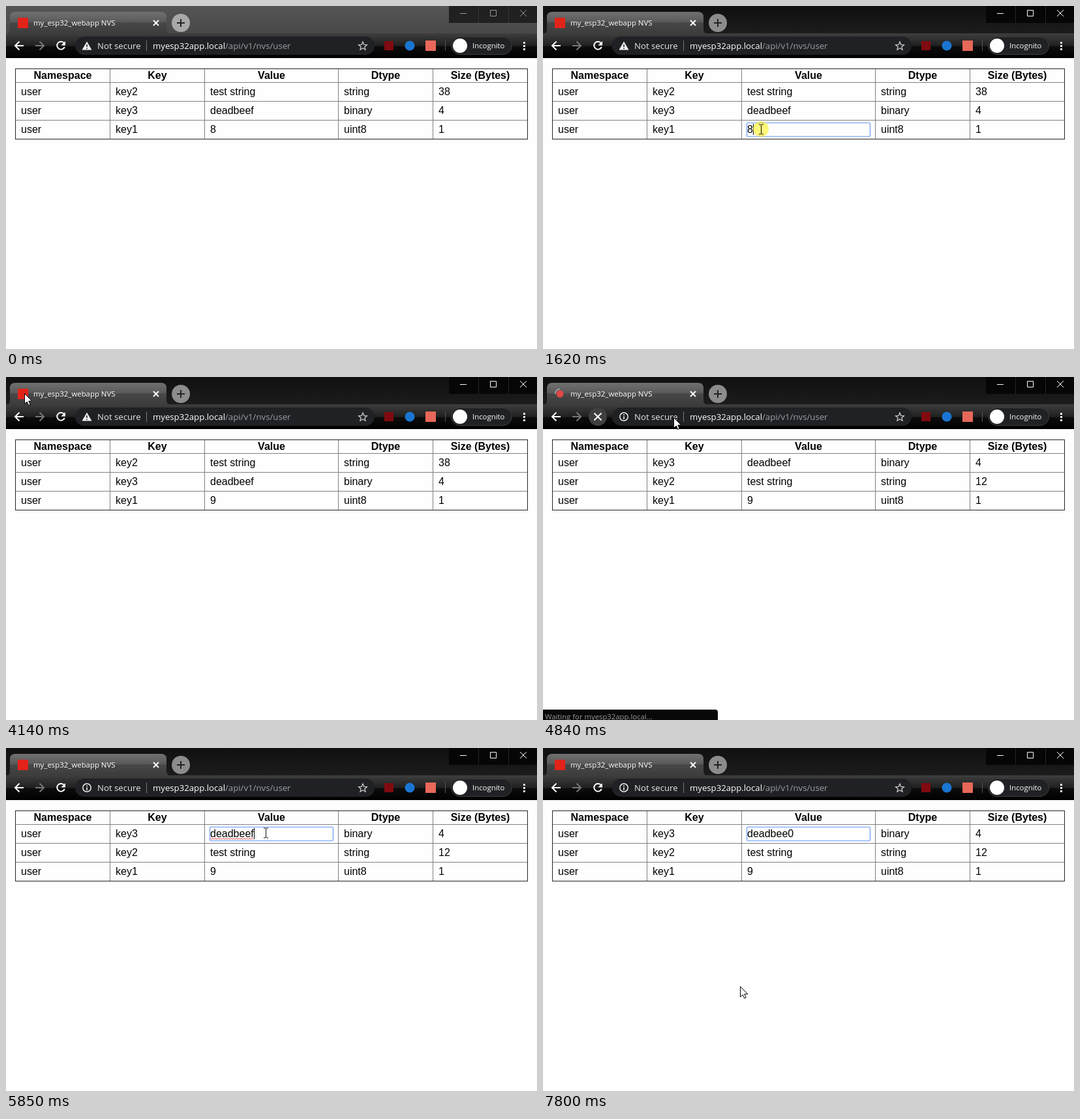
An HTML page for the animation above (8 s loop, 814 px wide and 527 px high).

```html
<!DOCTYPE html>
<html lang="en">
<head>
<meta charset="utf-8">
<title>NVS table</title>
<style>
html, body { margin: 0; width: 100%; height: 100%; overflow: hidden; background: #fefefe; }
svg { display: block; width: 814px; height: 527px; }
.ui { font-family: "Open Sans", "Noto Sans", sans-serif; fill: #fff; white-space: pre; }
.cell { font: 16px "Liberation Sans", Arial, sans-serif; fill: #000; }
.line { fill: none; stroke-width: 2; stroke: #fff; }
</style>
</head>
<body>
<svg id="stage" viewBox="0 0 814 527" xmlns="http://www.w3.org/2000/svg">
  <defs>
    <linearGradient id="idleBar" x2="0" y2="1">
      <stop stop-color="#555"/><stop offset="1" stop-color="#484848"/>
    </linearGradient>
    <linearGradient id="activeBar" x2="0" y2="1">
      <stop stop-color="#101010"/><stop offset="1" stop-color="#1c1c1c"/>
    </linearGradient>
    <linearGradient id="tabFill" x2="0" y2="1">
      <stop stop-color="#707070"/><stop offset=".45" stop-color="#5a5a5a"/>
      <stop offset=".5" stop-color="#474747"/><stop offset="1" stop-color="#3c3c3c"/>
    </linearGradient>
    <linearGradient id="toolFill" x2="0" y2="1">
      <stop stop-color="#3e3e3e"/><stop offset=".5" stop-color="#202020"/>
      <stop offset=".54" stop-color="#0c0c0c"/><stop offset="1" stop-color="#000"/>
    </linearGradient>
  </defs>
  <rect width="814" height="527" fill="#fefefe"/>

  <rect id="bar" width="814" height="43"/>
  <g id="windowButtons">
    <rect id="buttonBack" x="679" width="135" height="26"/>
    <path d="M724.5 0V26M770.5 0V26" stroke="#555" stroke-opacity=".4"/>
    <path id="buttonGlyphs" d="M696 11.5H706M742.500 6.500H751.500V15.500H742.500ZM788 6L798 16M798 6L788 16" fill="none"/>
  </g>
  <path d="M0 43Q6 43 6 35V17Q6 9 14 9H238Q246 9 246 17V35Q246 43 254 43Z" fill="url(#tabFill)"/>
  <rect id="favicon" x="18" y="18" width="16" height="16" fill="#e2231a"/>
  <g id="tabLoading">
    <circle cx="26" cy="26" r="5.500" fill="#e04a44"/>
    <path id="spinner" d="M26 18.500A7.500 7.500 0 0 0 18.500 26" fill="none" stroke="#aaa" stroke-width="1.500"/>
  </g>
  <text class="ui" x="42" y="30" font-size="11.4">my_esp32_webapp NVS</text>
  <path class="line" d="M226 22L234 30M234 22L226 30" stroke-width="1.700"/>
  <circle id="newTab" cx="268" cy="26" r="14"/>
  <path d="M262 26H274M268 20V32" stroke="#222" stroke-width="2"/>

  <rect y="42" width="814" height="38" fill="url(#toolFill)"/>
  <path class="line" d="M27 61H14.500M20.500 54.500L14 61L20.500 67.500"/>
  <path class="line" d="M45 61H57.500M51.500 54.500L58 61L51.500 67.500" style="stroke:#777"/>
  <g id="reload">
    <path class="line" d="M89 57A6 6 0 1 0 89.800 63"/>
    <path d="M91 54V60.500H84.500Z" fill="#fff"/>
  </g>
  <g id="stop">
    <circle cx="84" cy="61" r="14" fill="#3f3f3f"/>
    <path class="line" d="M78.500 55.500L89.500 66.500M89.500 55.500L78.500 66.500"/>
  </g>
  <rect x="106" y="47" width="459" height="28" rx="14" fill="#202124"/>
  <g id="warning">
    <path d="M124 54.500L131.500 67.500H116.500Z" fill="#eee"/>
    <path d="M124 59V63M124 64.500V66" stroke="#202124" stroke-width="1.500"/>
  </g>
  <g id="info">
    <circle cx="124" cy="61" r="6.200" fill="none" stroke="#eee" stroke-width="1.500"/>
    <path d="M124 57.300V59M124 60.300V65" stroke="#eee" stroke-width="1.600"/>
  </g>
  <g class="ui" font-size="13.2">
    <text x="140" y="66" fill="#e8eaed">Not secure</text>
    <text x="225" y="66">myesp32app.local<tspan fill="#9aa0a6">/api/v1/nvs/user</tspan></text>
  </g>
  <path d="M215.500 53V69" stroke="#777"/>
  <path d="M547 55L548.800 59.300L553.400 59.700L549.900 62.700L551 67.200L547 64.800L543 67.200L544.100 62.700L540.600 59.700L545.200 59.300Z" fill="none" stroke="#ccc" stroke-width="1.300"/>
  <rect x="580" y="54" width="14" height="14" fill="#800a10"/>
  <circle cx="619" cy="61" r="7.500" fill="#1a76d2"/>
  <rect x="643" y="53" width="16" height="16" fill="#e8685a"/>
  <path d="M673.500 53V69" stroke="#555"/>
  <rect x="682.500" y="47.500" width="93" height="27" rx="13.500" fill="#202124" stroke="#3c3c3c"/>
  <circle cx="696" cy="61" r="11" fill="#fff"/>
  <text class="ui" x="715" y="65" font-size="11.4">Incognito</text>
  <path d="M794.500 55v3M794.500 60v3M794.500 65v3" stroke="#fff" stroke-width="3"/>

  <g id="table">
    <path d="M15 117.500H799M15 146.500H799M15 175.500H799M159.500 97V204M304.500 97V204M509.500 97V204M654.500 97V204" stroke="#808080"/>
    <rect x="14.500" y="96.500" width="785" height="108" fill="none" stroke="#222"/>
  </g>
  <rect id="field" x="312.500" width="189" height="21" rx="1.500" fill="none" stroke="#8db4f6" stroke-width="1.700"/>
  <path id="squiggle" fill="none" stroke="#e33" stroke-width="1"/>
  <rect id="caret" width="1" height="17" fill="#000"/>

  <g id="status">
    <path d="M0 511H264Q268 511 268 515V527H0Z" fill="#080808"/>
    <text class="ui" x="3" y="526" font-size="11.3" style="fill:#9a9a9a">Waiting for myesp32app.local...</text>
  </g>

  <circle id="click" r="12" fill="#fff000" fill-opacity=".52"/>
  <path id="arrow" d="M.5 .5V16.500L4.200 13L6.700 18.500L9.200 17.400L6.800 12H11.800Z" fill="#fff" stroke="#000"/>
  <path id="beam" d="M-3.500 -7.500H-1L0 -6.500L1 -7.500H3.500M0 -6.500V6.500M-3.500 7.500H-1L0 6.500L1 7.500H3.500" fill="none" stroke="#111"/>
</svg>
<script>
const LOOP = 8000;
const $ = id => document.getElementById(id);
const within = (t, from, to) => t >= from && t < to;
const show = (id, on) => $(id).setAttribute('display', on ? 'inline' : 'none');
const place = (id, x, y) => $(id).setAttribute('transform', `translate(${x} ${y})`);
const paint = (id, name, value) => $(id).setAttribute(name, value);

const columns = [23, 168, 313, 518, 663];
const centers = [87, 232, 407, 582, 727];

function addCell(x, y, text, header) {
  const cell = document.createElementNS('http://www.w3.org/2000/svg', 'text');
  cell.setAttribute('class', 'cell');
  cell.setAttribute('x', x);
  cell.setAttribute('y', y);
  if (header) {
    cell.style.fontWeight = 'bold';
    cell.setAttribute('text-anchor', 'middle');
  }
  cell.textContent = text;
  $('table').append(cell);
  return cell;
}

['Namespace', 'Key', 'Value', 'Dtype', 'Size (Bytes)']
  .forEach((title, i) => addCell(centers[i], 112, title, true));
const cells = [137, 166, 195].map(y => columns.map(x => addCell(x, y, '')));

let wave = 'M313 138.500';
for (let x = 315, up = false; x <= 380; x += 2, up = !up) wave += `L${x} ${up ? 138.5 : 140.5}`;
paint('squiggle', 'd', wave);

// start, end, steps, x, y: each move begins where the previous one ended
const moves = [
  [380, 380, 1, 700, 494],
  [450, 910, 7, 360, 350],
  [1070, 1480, 7, 334, 189],
  [1860, 1940, 2, 373, 194],
  [3340, 3580, 4, 328, 360],
  [3800, 4140, 6, 28, 25],
  [4200, 4370, 3, 75, 55],
  [4720, 4840, 3, 200, 62],
  [4910, 5370, 7, 420, 170],
  [5450, 5670, 4, 398, 130],
  [5910, 6150, 4, 475, 134],
  [7550, 7800, 4, 302, 366]
];

function pointer(t) {
  let x = 700, y = 494;
  for (const [start, end, steps, toX, toY] of moves) {
    if (t < start) break;
    const done = end > start ? Math.min(1, (t - start) / (end - start)) : 1;
    const p = (Math.floor(done * (steps - 1)) + 1) / steps;
    const eased = p * p * (3 - 2 * p);
    x += (toX - x) * eased;
    y += (toY - y) * eased;
  }
  return [Math.round(x), Math.round(y)];
}

function drawTable(t) {
  const number = t < 2730 ? '8' : t < 2960 ? '' : '9';
  const binary = t < 6850 ? 'deadbeef' : t < 7090 ? 'deadbee' : 'deadbee0';
  const reloaded = t >= 4780;
  const rows = [
    ['user', 'key2', 'test string', 'string', reloaded ? '12' : '38'],
    ['user', 'key3', binary, 'binary', '4'],
    ['user', 'key1', number, 'uint8', '1']
  ];
  if (reloaded) [rows[0], rows[1]] = [rows[1], rows[0]];
  rows.forEach((row, r) => row.forEach((text, c) => {
    if (cells[r][c].textContent !== text) cells[r][c].textContent = text;
  }));
}

function drawField(t) {
  const first = within(t, 1620, 3660), second = t >= 5850;
  show('field', first || second);
  paint('field', 'y', second ? 121.5 : 179.5);
  show('squiggle', within(t, 5850, 6850));

  const blinkedOff = within(t, 2180, 2730) || within(t, 3490, 3660) ||
    within(t, 6370, 6850) || t >= 7600;
  show('caret', (first || second) && !blinkedOff);
  const x = first ? (within(t, 2730, 2960) ? 313 : 322)
    : t < 6850 ? 380 : t < 7090 ? 375 : 384;
  paint('caret', 'x', x);
  paint('caret', 'y', second ? 123 : 181);
}

function drawBrowser(t) {
  const active = t >= 1520, loading = within(t, 4660, 5200);
  paint('bar', 'fill', active ? 'url(#activeBar)' : 'url(#idleBar)');
  paint('buttonBack', 'fill', active ? '#060606' : '#202020');
  paint('buttonGlyphs', 'stroke', active ? '#fff' : '#999');
  paint('newTab', 'fill', active ? '#8c8c8c' : '#a8a8a8');
  show('favicon', !loading);
  show('tabLoading', loading);
  paint('spinner', 'transform', `rotate(${(4840 - t) * 0.36} 26 26)`);
  show('reload', !loading);
  show('stop', loading);
  show('warning', t < 4780);
  show('info', t >= 4780);
  show('status', within(t, 4780, 5200));
}

function drawPointer(t) {
  const [x, y] = pointer(t);
  const beam = within(t, 1480, 3410) || within(t, 5670, 7550);
  show('arrow', t >= 380 && !beam);
  show('beam', beam);
  place('arrow', x, y);
  place('beam', x + 0.5, y + 0.5);
  show('click', within(t, 1520, 1720) || within(t, 3600, 3760) ||
    within(t, 4600, 4720) || within(t, 5730, 5850));
  place('click', x, y);
}

function render(t) {
  drawBrowser(t);
  drawTable(t);
  drawField(t);
  drawPointer(t);
}

const began = performance.now();
function tick() {
  render((performance.now() - began) % LOOP);
  requestAnimationFrame(tick);
}
tick();
</script>
</body>
</html>
```
